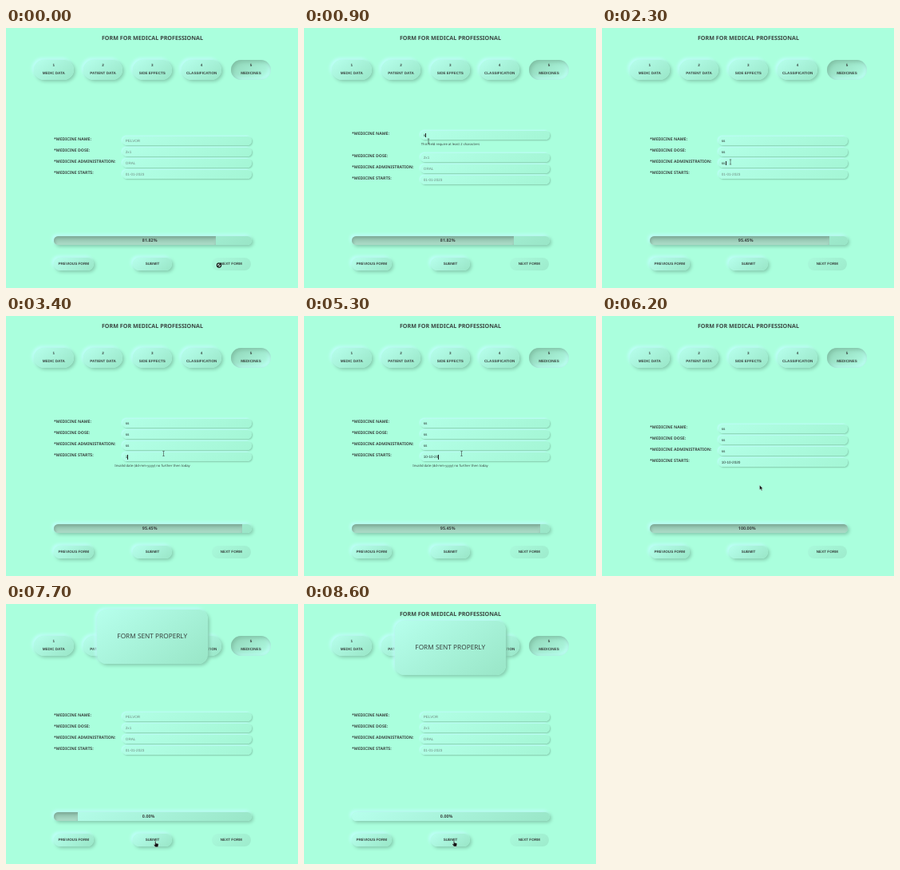
Write an HTML page that moves like this. It is 366 by 326 pixels and loops after 9.3 s.

```html
<!DOCTYPE html>
<html lang="en">
<head>
<meta charset="utf-8">
<title>Medical form</title>
<style>
  html, body { margin: 0; width: 100%; height: 100%; overflow: hidden; background: #aaffdd; }
  #stage { position: relative; width: 366px; height: 326px; overflow: hidden; text-rendering: geometricPrecision; }
  #stage div { position: absolute; white-space: pre; box-sizing: border-box; }
  .text { color: #3a4541; height: 10px; line-height: 10px; }
  .ui { font-family: "Liberation Sans", Arial, sans-serif; font-size: 4.62px; }
  .bold { font-weight: 700; }
  .mid { text-align: center; }
  .sans { font-family: "Noto Sans", "Open Sans", sans-serif; }
  .raised {
    background: linear-gradient(145deg, #b6ffec, #99e6c7);
    box-shadow: 2px 2px 4px #84c9ac, -2px -2px 4px #c3fffe;
  }
  .pressed {
    background: linear-gradient(145deg, #8fd3b6, #b2ffe6);
    box-shadow: inset 2px 2px 5px #7fbfa3, inset -2px -2px 5px #bffff6;
  }
  .off { background: linear-gradient(145deg, #a9fadb, #9debcc); }
  .field {
    background: linear-gradient(145deg, #b2ffe6, #a4f6d5);
    box-shadow: 1px 1px 2px #84c9ac, -1px -1px 2px #c3fffe;
  }
  .fill {
    background: linear-gradient(#93c4af, #a9d9c5);
    box-shadow: inset 1px 2px 4px #78a390, inset -1px -1px 3px #b4e4d1;
  }
  #stage svg { position: absolute; left: 0; top: 0; }
</style>
</head>
<body>
<div id="stage"></div>
<script>
const LOOP = 9300, STEP = 100;
const stage = document.getElementById('stage');

function box(cls, x, y, w, h, radius, parent = stage) {
  const el = document.createElement('div');
  el.className = cls;
  Object.assign(el.style, {
    left: x + 'px', top: y + 'px', width: w + 'px', height: h + 'px', borderRadius: radius + 'px'
  });
  parent.append(el);
  return el;
}

// Text line whose middle sits at y.
function text(cls, x, y, w, size, str, parent = stage) {
  const el = box('text ' + cls, x, y - 5, w, 10, 0, parent);
  if (size) el.style.fontSize = size + 'px';
  el.textContent = str;
  return el;
}

text('sans bold mid', 83.5, 13, 200, 7.15, 'FORM FOR MEDICAL PROFESSIONAL');

['MEDIC DATA', 'PATIENT DATA', 'SIDE EFFECTS', 'CLASSIFICATION', 'MEDICINES'].forEach((name, i) => {
  const x = 35 + i * 61.8;
  box(i === 4 ? 'pressed' : 'raised', x, 40, 49.5, 25, 12.5);
  text('ui bold mid', x, 47.2, 49.5, 0, String(i + 1));
  text('ui bold mid', x, 57, 49.5, 0, name);
});

const rows = [
  ['NAME', 'PELVOR'], ['DOSE', '2x1'], ['ADMINISTRATION', 'ORAL'], ['STARTS', '01-01-2023']
].map(([name, hint]) => {
  const el = box('', 0, 0, 366, 14, 0);
  text('sans bold', 60, 2.3, 85, 5.15, `*MEDICINE ${name}:`, el);
  box('field', 146, -0.5, 161.5, 11, 5.5, el);
  const value = text('ui', 149.8, 5.2, 140, 0, hint, el);
  const caret = box('', 0, 2.4, 0.5, 5.6, 0, el);
  caret.style.background = '#222';
  return { el, value, caret, hint };
});
const error = text('sans mid', 83.5, 0, 200, 4.2, '');

box('raised', 60, 260.5, 247.5, 11.5, 5.75);
const clip = box('', 60, 260.5, 247.5, 11.5, 5.75);
clip.style.overflow = 'hidden';
const fill = box('fill', 0, 0, 0, 11.5, 0, clip);
const percent = text('sans bold', 170.8, 265.8, 40, 5.4, '');

const buttons = ['PREVIOUS FORM', 'SUBMIT', 'NEXT FORM'].map((name, i) => {
  const x = 60 + i * 98.8;
  const el = box(i === 2 ? 'off' : 'raised', x, 288, 49.5, 16, 8);
  text('ui bold mid', x, 296, 49.5, 0, name);
  return el;
});

const modal = box('raised', 114, 21, 138.5, 68, 12);
text('sans mid', 0, 34, 138.5, 8.27, 'FORM SENT PROPERLY', modal);

// Pointer shapes, hot spot at the origin.
const shapes = {
  no: '<circle r="2.6" fill="#cfeee0" stroke="#111" stroke-width="1.1"/><path d="M-1.8 1.8L1.8-1.8" stroke="#111" stroke-width="1.1"/>',
  beam: '<path d="M-1.2-3H1.2M0-3V3M-1.2 3H1.2" fill="none" stroke="#4a5a54" stroke-width=".7"/>',
  arrow: '<path d="M0 0V6L1.4 4.8L2.4 7L3.4 6.5L2.4 4.4H4.2Z" fill="#111" stroke="#e8fff6" stroke-width=".35"/>',
  hand: '<path d="M-.6.4Q0-.5.6.4V2.6L3.4 3.3Q4 3.6 3.8 4.5L3.2 7.4H-.1L-2 4.9Q-2.2 4-1.2 4.2L-.6 4.7Z" fill="#111" stroke="#e8fff6" stroke-width=".35"/>'
};
stage.insertAdjacentHTML('beforeend', '<svg width="366" height="326"><g></g></svg>');
const pointer = stage.querySelector('svg g');

const track = [
  [0, 267, 297.5, 'no'], [100, 246, 281, 'arrow'], [200, 190, 232, 'arrow'], [300, 130, 178, 'arrow'],
  [400, 89, 148, 'arrow'], [500, 120, 143, 'beam'], [600, 156, 142, 'beam'],
  [1100, 156, 142, 'beam'], [1300, 159, 157, 'beam'], [1400, 159, 157, 'arrow'],
  [1600, 159, 157, 'beam'], [1800, 159, 157, 'beam'], [2000, 161, 168, 'beam'],
  [2400, 161, 168, 'beam'], [3000, 197.5, 172.5, 'beam'], [6000, 197.5, 172.5, 'beam'],
  [6100, 199, 186, 'arrow'], [6300, 196, 238, 'arrow'], [6500, 180, 294, 'hand'],
  [6600, 176, 305, 'arrow'], [6900, 187.3, 297.3, 'hand'], [8400, 187.3, 297.3, 'hand'],
  [8600, 188, 296.6, 'hand'], [LOOP, 188, 296.6, 'hand']
];

const typing = [
  [800, 0, 's'], [1000, 0, 'ss'], [1400, 1, 's'], [1600, 1, 'ss'], [2200, 2, 's'], [2300, 2, 'ss'],
  [3300, 3, '1'], [3500, 3, '10'], [3700, 3, '10-'], [4200, 3, '10-1'], [4300, 3, '10-10'],
  [4500, 3, '10-10-'], [5100, 3, '10-10-2'], [5300, 3, '10-10-20'], [5500, 3, '10-10-2020']
];

const levels = [[-LOOP, 81.82], [1000, 86.36], [1600, 90.91], [2300, 95.45], [5500, 100], [7400, 0]];
const PRESS = 7300, SENT = 7400;

const ease = p => 1 - (1 - Math.min(1, Math.max(0, p))) ** 2.3;
const lastIndex = (list, t) => list.findLastIndex(item => item[0] <= t);
const textWidth = s => [...s].reduce((w, c) => w + (c === '-' ? 0.333 : c === 's' ? 0.5 : 0.556), 0) * 4.62;

function drawForm(t) {
  const values = ['', '', '', ''];
  let focus = -1;
  if (t < SENT) {
    for (const [at, i, str] of typing) {
      if (at > t) break;
      values[i] = str;
      focus = i;
    }
  }
  const bad = values.findIndex((v, i) => v && v.length < (i === 3 ? 10 : 2));
  const top = bad < 0 ? 136.4 : 129.4;
  rows.forEach((row, i) => {
    const gap = bad >= 0 && i > bad ? 14 : 0;
    row.el.style.top = top + i * 14.05 + gap + 'px';
    row.value.textContent = values[i] || row.hint;
    row.value.style.color = values[i] ? '#222b28' : '#6f8a80';
    row.caret.style.left = 149.9 + textWidth(values[i]) + 'px';
    row.caret.style.visibility = i === focus && t < 5900 ? 'visible' : 'hidden';
  });
  error.textContent = bad < 0 ? '' : bad === 3
    ? 'Invalid date (dd-mm-yyyy) no further then today'
    : 'This field require at least 2 characters';
  error.style.top = 142 + bad * 14.05 - 0.2 + 'px';
}

function drawBar(t) {
  const i = lastIndex(levels, t);
  const [at, level] = levels[i];
  const from = i ? levels[i - 1][1] : level;
  const shown = from + (level - from) * ease((t - at) / 500);
  fill.style.width = shown * 2.475 + 'px';
  percent.textContent = level.toFixed(2) + '%';
}

function drawPointer(t) {
  const i = lastIndex(track, t);
  const [t0, x0, y0, kind] = track[i];
  const [t1, x1, y1] = track[Math.min(i + 1, track.length - 1)];
  const p = t1 > t0 ? (t - t0) / (t1 - t0) : 0;
  pointer.setAttribute('transform', `translate(${x0 + (x1 - x0) * p} ${y0 + (y1 - y0) * p})`);
  if (pointer.dataset.kind !== kind) {
    pointer.dataset.kind = kind;
    pointer.innerHTML = shapes[kind];
  }
}

function draw(t) {
  drawForm(t);
  drawBar(t);
  drawPointer(t);
  buttons[1].className = t >= PRESS && t < SENT ? 'pressed' : 'raised';
  modal.style.top = -76 + 97 * ease((t - PRESS) / 700) + 'px';
  modal.style.visibility = t >= SENT ? 'visible' : 'hidden';
}

const start = performance.now();
function tick() {
  const t = (performance.now() - start) % LOOP;
  draw(Math.floor(t / STEP) * STEP);
  requestAnimationFrame(tick);
}
tick();
</script>
</body>
</html>
```
